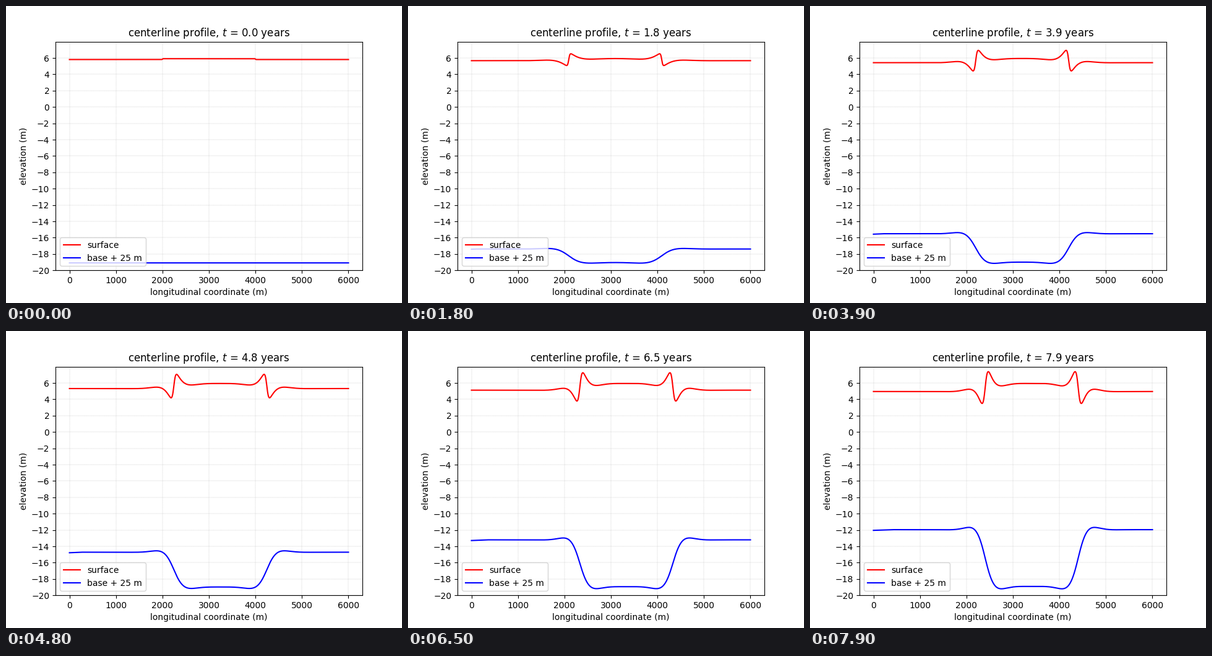
Recreate the animation shown at these times as a matplotlib script. Size 640 px wide and 480 px high, loop 8000 ms.

```python
import numpy as np
import matplotlib.pyplot as plt
from matplotlib.animation import FuncAnimation

FRAMES = 80
INTERVAL = 100   # ms
SPEED = 51       # advection, m per year

x = np.linspace(0, 6000, 1501)


def bend(z, a=0.95):
    """Odd step response of a floating plate, from -1 to 1 with overshoot."""
    k = (a * a - 1) / (2 * a)
    r = np.abs(z)
    return np.sign(z) * (1 - np.exp(-a * r) * (np.cos(r) + k * np.sin(r)))


def plateau(shape, width, t):
    """0 outside and 1 inside the drifting middle section."""
    left, right = 2000 + SPEED * t, 4000 + SPEED * t
    return (shape((x - left) / width) - shape((x - right) / width)) / 2


def profiles(t):
    settle = np.exp(-4 * t)
    base_out = -19.09 + 0.89 * t + 0.1 * (1 - settle)
    base_in = -19.09 + 0.021 * t
    surf_out = 5.88 - 0.117 * t - 0.07 * settle
    surf_in = 5.91 + 0.015 * (1 - np.exp(-t))

    flex = 146 + 66 / (1 + (t / 3.3) ** 3)
    edge = np.sqrt(70 + 325 * t)
    drop = base_out - base_in
    smooth = plateau(bend, flex, t)
    sharp = plateau(np.tanh, edge, t)

    base = base_out - drop * smooth
    surface = surf_out + (surf_in - surf_out + drop) * sharp - drop * smooth

    # slightly thicker ice entering on the left
    inflow = np.clip(1 - x / (SPEED * t + 1), 0, 1)
    base -= min(0.014 * t, 0.085) * inflow
    return surface, base


fig, ax = plt.subplots(figsize=(6.4, 4.8), dpi=100)
surface_line, = ax.plot([], [], "r", label="surface")
base_line, = ax.plot([], [], "b", label="base + 25 m")
ax.set(xlim=(-300, 6300), ylim=(-20, 8), yticks=np.arange(-20, 8, 2),
       xlabel="longitudinal coordinate (m)", ylabel="elevation (m)")
ax.grid(True, linestyle="--", linewidth=0.25)
ax.legend(loc="lower left")
title = ax.set_title("")


def update(i):
    t = i / 10
    surface, base = profiles(t)
    surface_line.set_data(x, surface)
    base_line.set_data(x, base)
    title.set_text(f"centerline profile, $t$ = {t:.1f} years")
    return surface_line, base_line, title


anim = FuncAnimation(fig, update, frames=FRAMES, interval=INTERVAL,
                     repeat=True, repeat_delay=0, blit=False)
plt.show()
```
